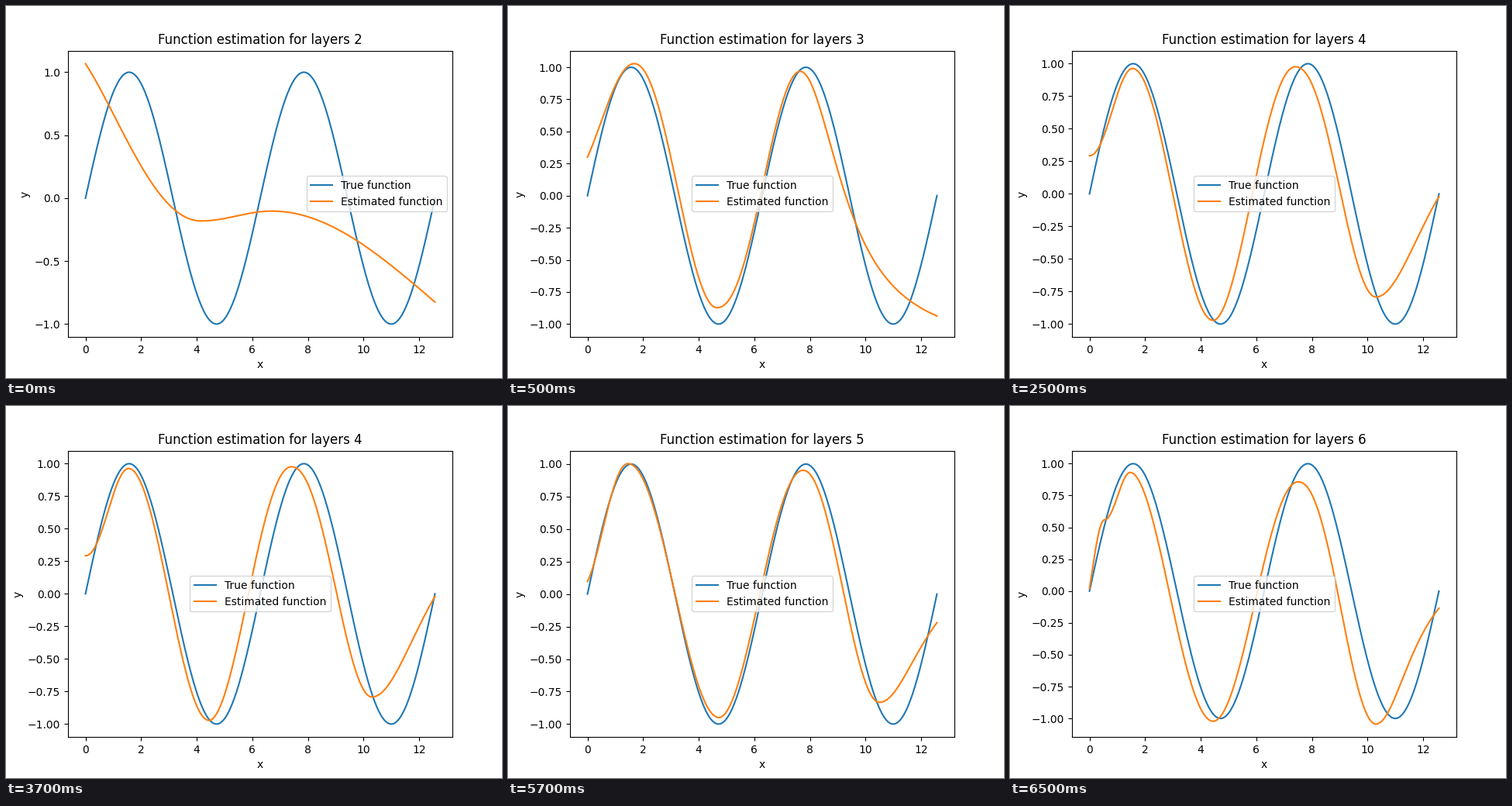
These frames come from a looping animation (640 px wide and 480 px high, 8000 ms). A matplotlib script:

```python
from itertools import pairwise

import numpy as np
import matplotlib.pyplot as plt
from matplotlib.animation import FuncAnimation

STEP_MS = 500
LOOP_MS = 8000

x = np.linspace(0, 4 * np.pi, 500)


def turn(at, height, skew=1):
    """A crest or trough; skew > 1 delays the swing that leads to it."""
    return at, height, skew


def estimate(turns, end_height, tail_width):
    """Cosine swings between turns, then a bell-shaped run-off to the end."""
    y = np.empty_like(x)
    for (x0, y0, _), (x1, y1, skew) in pairwise(turns):
        inside = (x >= x0) & (x <= x1)
        t = ((x[inside] - x0) / (x1 - x0)) ** skew
        y[inside] = y0 + (y1 - y0) * (1 - np.cos(np.pi * t)) / 2

    last_x, last_y, _ = turns[-1]
    tail = x > last_x
    squared = (x[tail] - last_x) ** 2
    bell = squared / (squared + tail_width)
    y[tail] = last_y + (end_height - last_y) * bell / bell[-1]
    return y


# Turns outside the plotted range set the slope of the curve at x = 0
estimates = {
    2: estimate([turn(-1, 1.279), turn(4.15, -0.181, 0.85),
                 turn(6.7, -0.103)], -0.825, 120),
    3: estimate([turn(-0.7, 0.12), turn(1.68, 1.028),
                 turn(4.65, -0.872, 1.05), turn(7.65, 0.968, 1.12)],
                -0.937, 3.3),
    4: estimate([turn(0, 0.293), turn(1.55, 0.963, 1.05),
                 turn(4.45, -0.972), turn(7.4, 0.976, 0.94),
                 turn(10.3, -0.792, 1.1)], -0.02, 6),
    5: estimate([turn(-0.2, 0.051), turn(1.45, 1.003, 0.93),
                 turn(4.73, -0.95, 1.03), turn(7.75, 0.952, 0.96),
                 turn(10.5, -0.833, 1.04)], -0.22, 4),
    6: estimate([turn(-0.15, -0.11), turn(0.55, 0.56, 0.8),
                 turn(1.47, 0.931), turn(4.45, -1.022, 0.95),
                 turn(7.5, 0.857, 0.98), turn(10.3, -1.044, 1.11)],
                -0.135, 2.64),
}

fig, ax = plt.subplots(figsize=(6.4, 4.8), dpi=100)


def draw(step):
    # The first estimate shows for one step, each later one for four
    layers = 2 + (step + 3) // 4
    ax.clear()
    ax.plot(x, np.sin(x), label="True function")
    ax.plot(x, estimates[layers], label="Estimated function")
    ax.set_title(f"Function estimation for layers {layers}")
    ax.set_xlabel("x")
    ax.set_ylabel("y")
    ax.legend(loc="center right" if layers == 2 else "center")
    return ax.get_children()


animation = FuncAnimation(fig, draw, frames=LOOP_MS // STEP_MS,
                          init_func=lambda: draw(0), interval=STEP_MS,
                          repeat=True, repeat_delay=0, blit=False)
plt.show()
```
